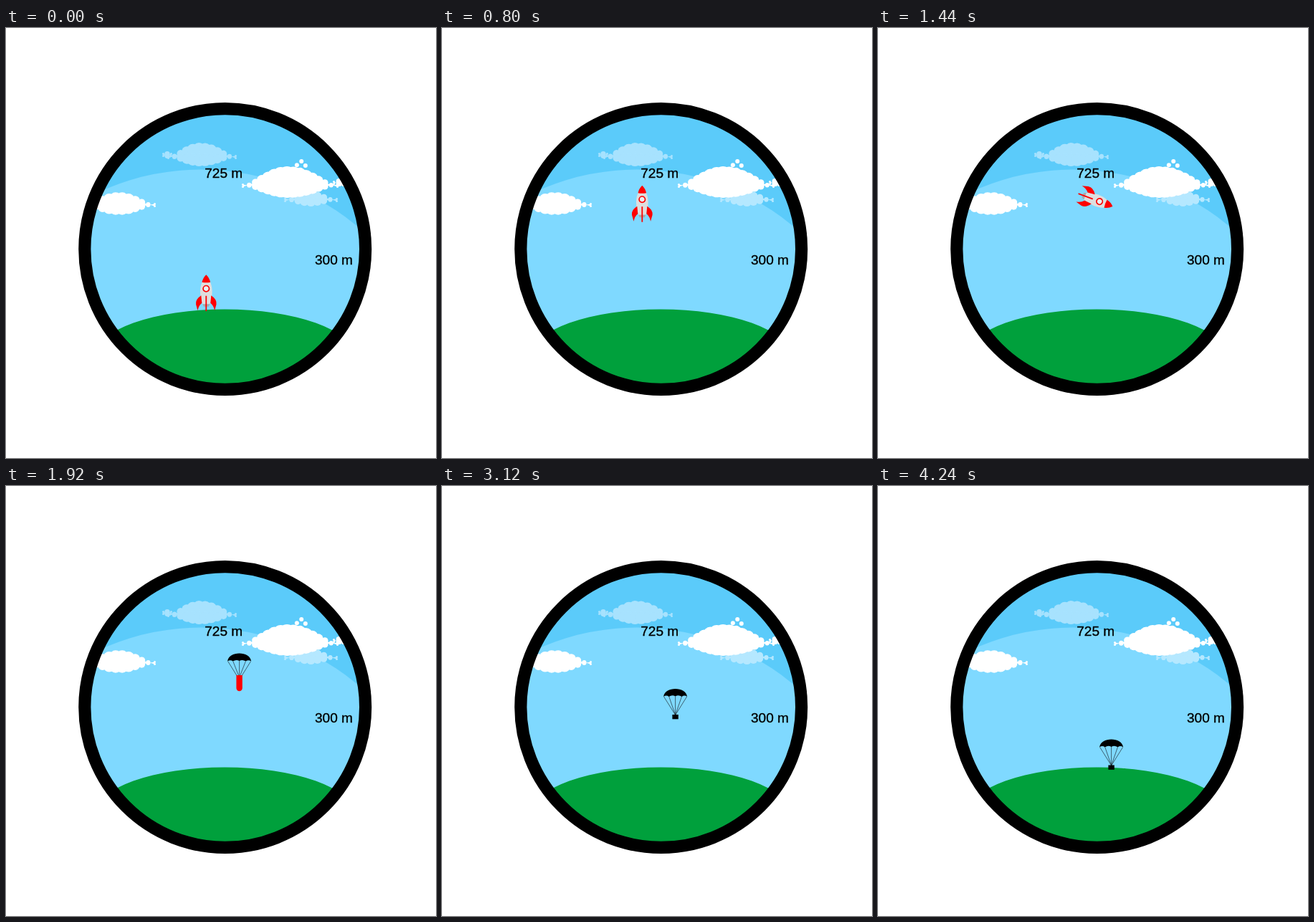
An HTML page for the animation above (4320 ms loop, 600 px wide and 600 px high).

```html
<!DOCTYPE html>
<html lang="en">
<head>
<meta charset="utf-8">
<title>Rocket flight</title>
<style>
  html, body { margin: 0; width: 100%; height: 100%; overflow: hidden; background: #fff; }
  svg { display: block; width: 100vw; height: 100vh; }
  text { font: 19px "Liberation Sans", Arial, sans-serif; stroke: #000; stroke-width: .35px; }
</style>
</head>
<body>
<svg viewBox="0 0 600 600">
  <defs>
    <clipPath id="porthole"><circle cx="305.7" cy="308.5" r="190"/></clipPath>
    <path id="canopy" d="M-16.5 11C-15 -3.7 15 -3.7 16.5 11Q12.5 8.2 9 11Q4.5 8 0 10.5Q-4.5 8 -9 11Q-12.5 8.2 -16.5 11Z"/>
    <path id="fin" d="M7 3.5Q15.5 9 14.2 16L11.8 24.5Q10.5 17.5 6 14Z" fill="#f00"/>
  </defs>
  <g clip-path="url(#porthole)">
    <rect x="100" y="100" width="412" height="414" fill="#5bcbfa"/>
    <circle cx="272" cy="537.5" r="340" fill="#7fd9ff"/>
    <g id="clouds"></g>
    <path d="M125 457.4A180 64.9 0 0 1 485 457.4V520H125Z" fill="#00a03c"/>
  </g>
  <circle cx="305.7" cy="308.5" r="195.9" fill="none" stroke="#000" stroke-width="17.2"/>
  <text x="277.3" y="209">725 m</text>
  <text x="431" y="330">300 m</text>

  <g id="rocket">
    <path d="M-5.6 -15.5C-10 -6 -8.5 6 -5 15.5H5C8.5 6 10 -6 5.6 -15.5Z" fill="#dedede"/>
    <path d="M0 -25.5Q4.6 -21 5.8 -15Q0 -14 -5.8 -15Q-4.6 -21 0 -25.5Z" fill="#f00"/>
    <use href="#fin"/>
    <use href="#fin" transform="scale(-1 1)"/>
    <path d="M-5 15.5H5L3.5 19H-3.5Z" fill="#a9a9a9"/>
    <circle cy="-6" r="4.2" fill="#e8f3f8" stroke="#f00" stroke-width="1.7"/>
    <path d="M0 4V25.5" stroke="#f00" stroke-width="1.8"/>
  </g>
  <g id="container">
    <path d="M-16 11L-3.5 31M-8.8 11L-1 31M0 10.5V31M8.8 11L1 31M16 11L3.5 31" fill="none" stroke="#111" stroke-width=".6"/>
    <use href="#canopy"/>
    <path d="M-4.2 30.5H4.2V48.5A4.2 4.2 0 0 1 -4.2 48.5Z" fill="#f00"/>
  </g>
  <g id="payload">
    <path d="M-16 11L0 36.5L-8.8 11M0 10.5V36.5L8.8 11M16 11L0 36.5" fill="none" stroke="#111" stroke-width=".6"/>
    <use href="#canopy"/>
    <rect x="-4.2" y="36" width="8.4" height="6.3"/>
  </g>
</svg>
<script>
const LOOP = 4320, STEP = 80;
const CHUTE_X = 325.6, FALL_SPEED = 0.0695;
const byId = id => document.getElementById(id);
const progress = (t, from, to) => Math.max(0, Math.min(1, (t - from) / (to - from)));
const mix = (a, b, p) => a + (b - a) * p;

const circle = (x, y, r) => `<circle cx="${x}" cy="${y}" r="${r}"/>`;

// Two rows of puffs swell from both tips towards the peak, around a solid core.
function addCloud({ color, left, right, y, up, down, peak, bubbles = 0 }) {
  const width = right - left;
  const swell = u => Math.sin(Math.PI / 2 * (u < peak ? u / peak : (1 - u) / (1 - peak))) ** 1.2;
  const count = Math.round(width / 9);
  let puffs = '', top = '', bottom = '';
  for (let i = 0; i <= count; i++) {
    const u = i / count, s = swell(u);
    const r = 1.5 + s * (up + down) * 0.22;
    const x = mix(left + 1.5, right - 1.5, u);
    const high = y - up * s + r, low = y + down * s - r;
    puffs += circle(x, high, r) + circle(x, low, r);
    top += ` ${x},${high}`;
    bottom = ` ${x},${low}` + bottom;
  }
  for (let i = 0; i < bubbles; i++) {
    const angle = 1.5 * i;
    puffs += circle(left + width * peak + 18 + 6 * Math.cos(angle), y - up - 1 - 6 * Math.sin(angle), 3);
  }
  byId('clouds').innerHTML +=
    `<g fill="${color}"><polygon points="${top}${bottom}"/>${puffs}</g>`;
}

addCloud({ color: '#a7e2fe', left: 225, right: 322, y: 180, up: 20, down: 13, peak: 0.48 });
addCloud({ color: '#a7e2fe', left: 218, right: 232, y: 177, up: 5, down: 5, peak: 0.5 });
addCloud({ color: '#b5e8ff', left: 388, right: 463, y: 240, up: 13, down: 9, peak: 0.48 });
addCloud({ color: '#fff', left: 329, right: 464, y: 220, up: 27, down: 17, peak: 0.48, bubbles: 4 });
addCloud({ color: '#fff', left: 456, right: 480, y: 216, up: 7, down: 6, peak: 0.5 });
addCloud({ color: '#fff', left: 106, right: 209, y: 247, up: 18, down: 14, peak: 0.5 });

function place(id, visible, x, y, angle = 0, opacity = 1) {
  const el = byId(id);
  el.setAttribute('visibility', visible ? 'visible' : 'hidden');
  el.setAttribute('transform', `translate(${x} ${y}) rotate(${angle})`);
  el.setAttribute('opacity', opacity);
}

function draw(t) {
  const climb = progress(t, 0, 800);
  const turn = progress(t, 800, 1440);
  const rocketY = mix(369.7, 245.2, climb) - 5.2 * turn - 20 * turn * (1 - turn);
  place('rocket', t < 1840, mix(279.3, 303.5, turn), rocketY, 110.5 * turn,
    1 - progress(t, 1600, 1840));

  const containerY = 272.5 - FALL_SPEED * Math.max(0, 2480 - t);
  place('container', t >= 1600 && t < 2800, CHUTE_X, containerY);

  const payloadY = Math.min(353.5, 283 + FALL_SPEED * Math.max(0, t - 3120));
  place('payload', t >= 2800, CHUTE_X, payloadY);
}

const start = performance.now();
function tick() {
  const elapsed = (performance.now() - start) % LOOP;
  draw(Math.floor(elapsed / STEP) * STEP);
  requestAnimationFrame(tick);
}
tick();
</script>
</body>
</html>
```
